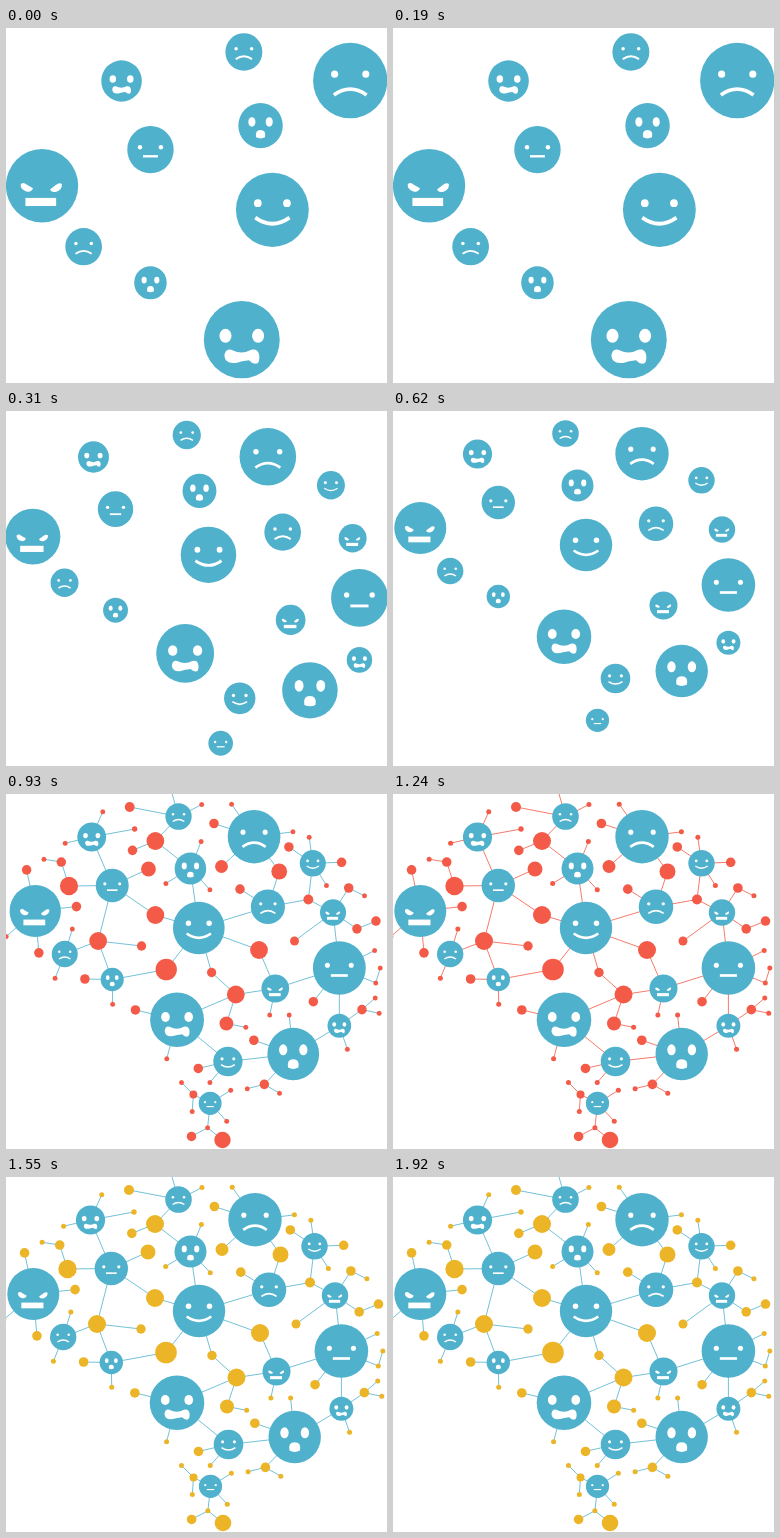
These frames come from a looping animation (381x355 px, 2170 ms). An HTML page with a canvas:

```html
<!DOCTYPE html>
<html lang="en">
<head>
<meta charset="utf-8">
<title>Network of moods</title>
<style>
html, body { margin: 0; width: 100%; height: 100%; overflow: hidden; background: #fff; }
canvas { display: block; }
</style>
</head>
<body>
<canvas id="stage" width="381" height="355"></canvas>
<script>
const ctx = document.getElementById('stage').getContext('2d');
const BLUE = '#50b1cd', RED = '#f35a47', GOLD = '#ecb527';
const hubs = [], dots = [], links = [];

const link = (a, b) => links.push([a, b]);

// Every ball can sprout beads and specks at a set gap, in given directions (degrees).
class Ball {
  constructor(x, y, r) { Object.assign(this, { x, y, r }); }
  sprout(degrees, r, gap) {
    const angle = degrees * Math.PI / 180, reach = this.r + gap;
    return joint(this.x + reach * Math.cos(angle), this.y + reach * Math.sin(angle), r, this);
  }
  bead(degrees) { return this.sprout(degrees, 4.8, 16); }
  speck(degrees) { return this.sprout(degrees, 2.5, 13); }
  beads(...directions) { directions.forEach(d => this.bead(d)); return this; }
  specks(...directions) { directions.forEach(d => this.speck(d)); return this; }
}
function joint(x, y, r, ...partners) {
  const ball = new Ball(x, y, r);
  dots.push(ball);
  partners.forEach(partner => link(partner, ball));
  return ball;
}
function hub(mood, x, y, r) {
  const ball = new Ball(x, y, r);
  ball.mood = mood;
  hubs.push(ball);
  return ball;
}

// The first ten hubs are visible in the close-up.
const crown = hub('sad', 249, 42.7, 26.7).beads(198).specks(235, 353);
const top1 = hub('sad', 172.5, 22.5, 13.3).specks(254, 333);
const brow = hub('fear', 84.5, 43, 14.6).specks(294, 167);
const temple = hub('flat', 105.3, 91.5, 16.7);
const upper = hub('shock', 184.5, 74.5, 16).specks(292, 149, 47);
const centre = hub('smile', 193, 134, 26.2);
const front = hub('angry', 27.3, 117, 26).beads(258, 354, 85).specks(139);
const cheek = hub('sad', 57.2, 160, 13.2).specks(287, 112);
const jaw = hub('shock', 105.3, 185.5, 11.7).beads(181).specks(89);
const lower = hub('fear', 171, 225.7, 27.3).beads(193).specks(105);
const base = hub('smile', 222.5, 267.5, 14.8).beads(167).specks(131);
const stem = hub('flat', 204.5, 309.3, 11.6).specks(328, 47);
const nape = hub('shock', 288.7, 260, 26.2).beads(199).specks(264);
const inner = hub('angry', 270.5, 194.5, 14).specks(102);
const ridge = hub('sad', 263, 112.8, 17.3).beads(212);
const rear = hub('smile', 308.5, 69.3, 13.2).beads(214, 358).specks(262, 58);
const slope = hub('angry', 329, 118.5, 13.2);
const back = hub('flat', 335.4, 174, 26.8).beads(128).specks(334);
const heel = hub('fear', 335.4, 231.7, 12).specks(71);

// Chains that run on from a bead
nape.bead(134).specks(166, 30);
slope.bead(303).speck(26);
slope.bead(34).bead(338);
back.speck(22).speck(287);
heel.bead(325).specks(319, 12);

// Joints that tie hubs together or sit farther out
joint(123, 13, 5, top1);
joint(149, 47, 9, top1, upper).bead(158);
joint(128, 35, 2.7, brow);
joint(216, 72.5, 6.5, crown);
joint(274.5, 77.5, 8, crown, ridge);
joint(142, 75, 7.5, temple);
joint(61.5, 92, 9.2, temple).bead(252).speck(189);
joint(149, 121, 9, temple, centre);
const knot = joint(91, 147, 9, temple, cheek, jaw);
joint(135, 152, 4.7, knot);
joint(160, 175.5, 10.8, centre, jaw);
joint(254, 156, 9, centre, inner);
const cross = joint(230.5, 200.5, 9, inner, lower);
joint(206, 178.5, 4.7, centre, cross);
joint(221, 229.5, 7, cross).speck(11);
joint(304, 105.5, 5, rear, ridge, slope);
joint(290, 147, 4.5, slope);
joint(187.5, 300.5, 4, stem).specks(225, 94);
const fork = stem.speck(96);
fork.bead(152);
joint(217, 346, 8.3, fork);

[[brow, temple], [upper, centre], [centre, ridge], [lower, base], [base, nape],
 [nape, heel], [inner, back], [slope, back], [back, heel]].forEach(pair => link(...pair));

function oval(x, y, rx, ry = rx) {
  ctx.beginPath();
  ctx.ellipse(x, y, rx, ry, 0, 0, Math.PI * 2);
  ctx.fill();
}
function eyes(x, y, rx, ry) {
  oval(-x, y, rx, ry);
  oval(x, y, rx, ry);
}
function curve(x, y, bend) {
  ctx.beginPath();
  ctx.moveTo(-x, y);
  ctx.quadraticCurveTo(0, bend, x, y);
  ctx.stroke();
}
const shape = path => ctx.fill(new Path2D(path));

// Features are drawn on a face of radius 1.
const moods = {
  sad() { eyes(.42, -.17, .095); curve(.44, .38, .07); },
  smile() { eyes(.4, -.18, .105); curve(.47, .21, .54); },
  flat() { eyes(.45, -.1, .095); curve(.32, .28, .28); },
  angry() {
    shape('M-.59-.04Q-.52-.12-.42-.03L-.25 .07Q-.3 .2-.45 .15Q-.6 .1-.59-.04Z');
    shape('M.55-.05Q.47-.1 .38-.02L.22 .1Q.27 .2 .4 .16Q.56 .1 .55-.05Z');
    ctx.fillRect(-.46, .33, .85, .22);
  },
  shock() {
    eyes(.39, -.16, .16, .21);
    shape('M-.2 .52Q-.26 .2 0 .2Q.26 .2 .2 .52Q0 .62-.2 .52Z');
  },
  fear() {
    eyes(.43, -.1, .16, .18);
    shape('M-.46 .41Q-.43 .22-.28 .26Q0 .4 .25 .26Q.43 .22 .46 .4Q.48 .62 .36 .62Q.26 .61 .19 .53Q0 .55-.15 .6Q-.44 .64-.46 .41Z');
  }
};

function face({ mood, x, y, r }) {
  ctx.save();
  ctx.translate(x, y);
  ctx.scale(r, r);
  ctx.fillStyle = BLUE;
  oval(0, 0, 1);
  ctx.fillStyle = ctx.strokeStyle = '#fff';
  ctx.lineWidth = .1;
  moods[mood]();
  ctx.restore();
}
function drawNet(dotColor, lineColor) {
  ctx.strokeStyle = lineColor;
  ctx.lineWidth = .8;
  ctx.beginPath();
  for (const [a, b] of links) {
    ctx.moveTo(a.x, a.y);
    ctx.lineTo(b.x, b.y);
  }
  ctx.stroke();
  ctx.fillStyle = dotColor;
  dots.forEach(({ x, y, r }) => oval(x, y, r));
}

// view: x scale, y scale, x offset, y offset
const HOLD = 310, LOOP = 2170, FULL = [1, 1, 0, 0];
const scenes = [
  { view: [1.39, 1.416, -1.9, -7.9], count: 10 },
  { view: [1.06, 1.075, -2.1, -.2] },
  { view: FULL },
  { view: [.987, 1, 2.3, 0], net: [RED, BLUE] },
  { view: FULL, net: [RED, RED] },
  { view: FULL, net: [GOLD, BLUE] }
];

function draw(now) {
  const step = Math.floor(now % LOOP / HOLD);
  const { view: [sx, sy, dx, dy], count, net } = scenes[Math.min(step, scenes.length - 1)];
  ctx.setTransform(1, 0, 0, 1, 0, 0);
  ctx.clearRect(0, 0, 381, 355);
  ctx.setTransform(sx, 0, 0, sy, dx, dy);
  if (net) drawNet(...net);
  hubs.slice(0, count).forEach(face);
}

const start = performance.now();
function tick() {
  draw(performance.now() - start);
  requestAnimationFrame(tick);
}
tick();
</script>
</body>
</html>
```
